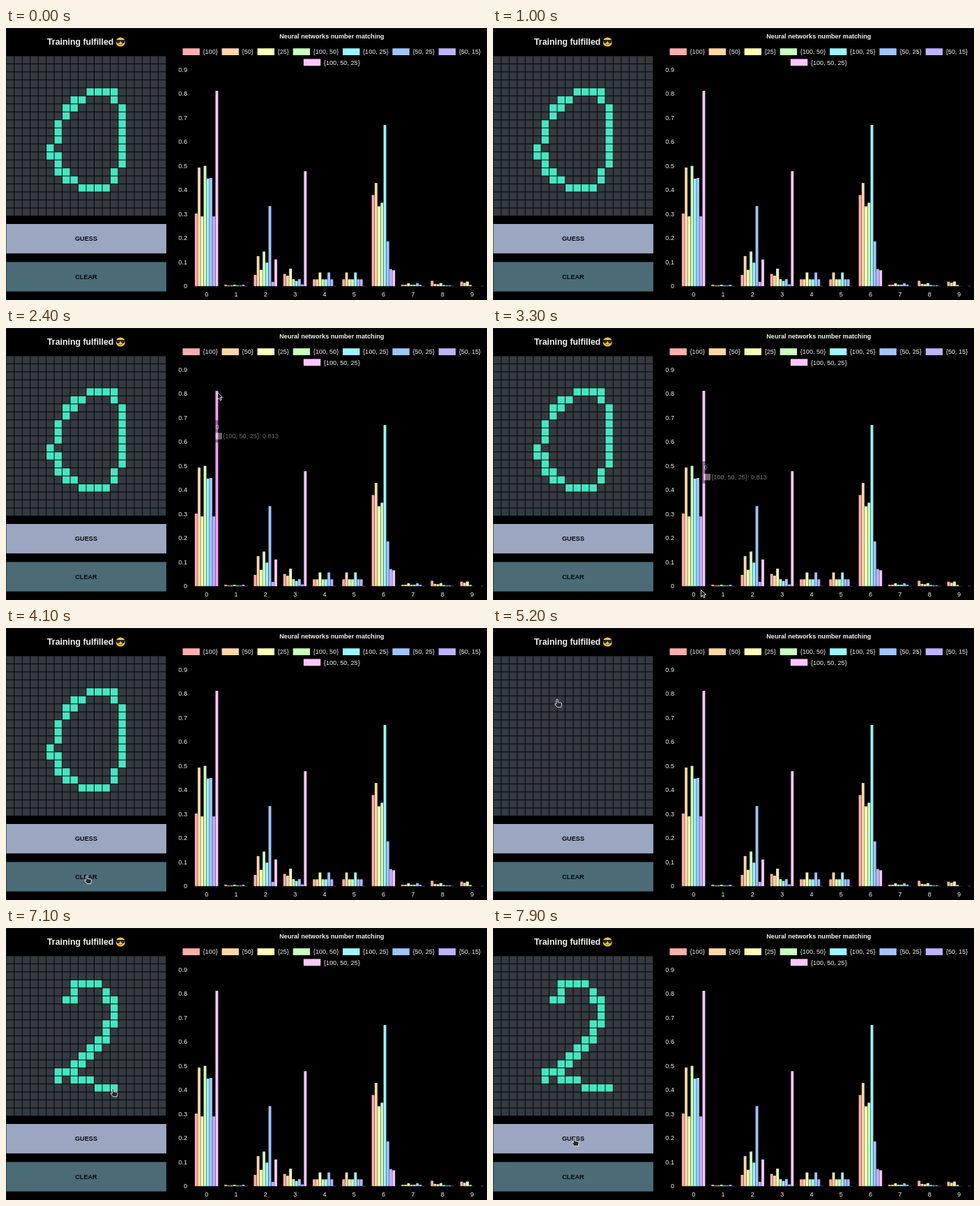
An HTML page for the animation above (8 s loop, 690 px wide and 390 px high).

```html
<!DOCTYPE html>
<html lang="en">
<head>
<meta charset="utf-8">
<title>Number matching</title>
<style>
  html, body { margin: 0; width: 100%; height: 100%; overflow: hidden; background: #000; }
  svg { display: block; width: 690px; height: 390px; }
  text { font-family: "Liberation Sans", Arial, sans-serif; font-size: 9.15px; fill: #f4f4f4; }
  .bold { font-weight: bold; }
  .mid { text-anchor: middle; }
</style>
</head>
<body>
<svg id="stage" viewBox="0 0 690 390"></svg>
<script>
const LOOP = 8000, STEP = 100;
const SIZE = 20, PITCH = 11.48, GRID_Y = 40;
const OFF = '#343a40', ON = '#48e5c2';
const stage = document.getElementById('stage');

function add(tag, attrs, parent = stage, content) {
  const el = document.createElementNS('http://www.w3.org/2000/svg', tag);
  for (const key in attrs) el.setAttribute(key, attrs[key]);
  if (content !== undefined) el.textContent = content;
  parent.appendChild(el);
  return el;
}
const rect = (x, y, width, height, fill, parent) => add('rect', { x, y, width, height, fill }, parent);
const label = (x, y, content, attrs = {}, parent) => add('text', { x, y, ...attrs }, parent, content);
const move = (el, x, y) => el.setAttribute('transform', `translate(${x} ${y})`);

// Left panel
rect(0, 0, 690, 0.8, '#0d2230');
rect(0, 0, 0.7, 390, '#0a1a24');
label(59, 24.4, 'Training fulfilled', { class: 'bold', style: 'font-size:12.35px' });
add('circle', { cx: 164.3, cy: 20, r: 6.6, fill: '#f8c53a' });
add('path', { d: 'M157.8 17h13v1.6q-.5 3.4-3 3.4t-3.1-3h-.8q-.6 3-3.1 3t-3-3.4z', fill: '#23282b' });
add('path', { d: 'M161.6 23.2q2.8 1.8 5.6-.4', fill: 'none', stroke: '#6a4312', 'stroke-width': 0.9 });

const cells = Array.from({ length: SIZE * SIZE }, (_, i) => rect(
  i % SIZE * PITCH + 0.7, GRID_Y + Math.floor(i / SIZE) * PITCH + 0.4, PITCH - 0.95, PITCH - 0.95, OFF));

function button(y, fill, name) {
  rect(0.5, y, 229.5, 42.2, fill);
  label(115, y + 24.4, name, { class: 'bold mid', style: 'fill:#07090c' });
}
button(281, '#9ba6c0', 'GUESS');
button(335.5, '#4b6b77', 'CLEAR');

// Legend
const MID = 467.3, BOX = 24.4, PAD = 4.6, GAP = 5.8;
const COLORS = ['#ffadad', '#ffd6a5', '#fdffb6', '#caffbf', '#9bf6ff', '#a0c4ff', '#bdb2ff', '#ffc6ff'];
const NAMES = ['{100}', '{50}', '{25}', '{100, 50}', '{100, 25}', '{50, 25}', '{50, 15}', '{100, 50, 25}'];

function legendRow(y, from, to) {
  const row = add('g', {});
  let x = 0;
  for (let i = from; i < to; i++) {
    rect(x, y - 4.8, BOX, 9.8, COLORS[i], row);
    const name = label(x + BOX + PAD, y + 3.3, NAMES[i], {}, row);
    x += BOX + PAD + name.getComputedTextLength() + GAP;
  }
  move(row, MID - (x - GAP) / 2, 0);
}
label(MID, 14.8, 'Neural networks number matching', { class: 'bold mid' });
legendRow(34, 0, 7);
legendRow(49.2, 7, 8);

// Chart: strong matches in thousandths, the rest as fading ripples [level, peak, fade]
const BASE = 370.2, UNIT = 345, GROUP = 42.3, BAR = 4.23;
const STRONG = {
  0: [302, 493, 290, 500, 447, 450, 290, 812],
  2: [47, 125, 68, 144, 98, 333, 18, 111],
  6: [379, 429, 332, 347, 670, 186, 71, 66]
};
const WEAK = {
  1: [4, 0, 0], 3: [68, 2, 1], 4: [38, 2, 0], 5: [38, 1, 0], 7: [8, 2, 0], 8: [15, 0, 1], 9: [25, 2, 1.7]
};
const SPIKE = 478;

function score(digit, i) {
  if (STRONG[digit]) return STRONG[digit][i];
  if (i === 7) return digit === 3 ? SPIKE : 1;
  const [level, peak, fade] = WEAK[digit];
  const ripple = 1 + 0.5 * Math.cos((i - peak) * Math.PI * 2 / 3);
  return level * ripple * Math.max(0, 1 - fade * i / 7);
}

const bars = [];
for (let digit = 0; digit < 10; digit++) {
  const mid = 287.8 + digit * GROUP;
  label(260, BASE + 3.2 - digit * UNIT / 10, digit ? '0.' + digit : '0', { 'text-anchor': 'end' });
  label(mid, 385.2, digit, { class: 'mid' });
  COLORS.forEach((color, i) => {
    const h = score(digit, i) / 1000 * UNIT;
    bars.push(rect(mid + (i - 4) * BAR, BASE - h, BAR * 0.91, h, color));
  });
}

// Tooltip
const tip = add('g', {});
const tipBox = add('path', { fill: '#000', 'fill-opacity': 0.8 }, tip);
label(4.6, 12.4, '0', {}, tip);
const swatch = add('rect', { x: 5, y: 18.5, width: 8.4, height: 8.4, stroke: '#fff', 'stroke-width': 0.8 }, tip);
const tipText = label(15.2, 26.1, '', {}, tip);

function setTip(series, value) {
  tipText.textContent = NAMES[series] + ': ' + value;
  swatch.setAttribute('fill', COLORS[series]);
  const right = tipText.getComputedTextLength() + 17;
  tipBox.setAttribute('d', `M3 0H${right}q3 0 3 3V29q0 3-3 3H3q-3 0-3-3V20l-4-4 4-4V3q0-3 3-3z`);
}

// Pointers, with the hot spot at 0,0
const arrow = add('path', {
  d: 'M.4 .4V10.4L2.8 8.3 4.4 11.8 6.2 11 4.7 7.6H7.8z',
  fill: '#15171a', stroke: '#e6e6e6', 'stroke-width': 1
});
const hand = add('path', {
  d: 'M-1.1 1.2q0-1.2 1.1-1.2t1.1 1.2V4.4l4.2.8q1.4.3 1.3 1.7L5.8 11.6H.2L-2.9 7.8q-.7-1.4.6-1.5L-1.1 7.2z',
  fill: '#24282c', stroke: '#f2f2f2', 'stroke-width': 0.9
});

// Interpolates rows of [time, ...values], holding both ends
const linear = k => k;
const smooth = k => k * k * (3 - 2 * k);
function track(rows, t, ease = linear) {
  const next = rows.findIndex(row => row[0] >= t);
  if (next < 1) return rows.at(next).slice(1);
  const a = rows[next - 1], b = rows[next];
  const k = ease((t - a[0]) / (b[0] - a[0]));
  return a.slice(1).map((v, i) => v + (b[i + 1] - v) * k);
}

// Cells along a polyline, stepping sideways before up or down
function trace(points) {
  const path = [points[0]];
  for (let p = 1; p < points.length; p++) {
    const [x, y] = points[p - 1], dx = points[p][0] - x, dy = points[p][1] - y;
    const n = Math.abs(dx) + Math.abs(dy);
    for (let k = 1; k <= n; k++) {
      const across = Math.ceil(k * Math.abs(dx) / n);
      path.push([x + Math.sign(dx) * across, y + Math.sign(dy) * (k - across)]);
    }
  }
  return path;
}

const ZERO = [
  [[13, 5], [13, 4], [10, 4]], [[9, 5], [7, 7]], [[6, 8], [6, 10]],
  [[5, 11], [5, 12], [6, 12], [6, 14], [7, 15], [8, 15]],
  [[9, 16], [12, 16]], [[13, 15], [13, 14]], [[14, 13], [14, 6]]
].flatMap(trace);
const TWO = [
  [[7, 5], [8, 5], [8, 3], [11, 3]],
  [[12, 4], [12, 5], [13, 5], [13, 8], [12, 8], [12, 10], [8, 14], [6, 14], [6, 15]],
  [[8, 15], [10, 15]], [[11, 16], [14, 16]]
].flatMap(trace);

const ENTER = 1600, CLEAR_AT = 4200, DRAW_AT = 5400, DRAW_END = 7200;
const PROGRESS = [[DRAW_AT, 0], [6200, 16], [6400, 24], [DRAW_END, TWO.length - 1]];
const POINTER = [
  [ENTER, 274, 352], [1800, 265, 375], [2400, 303, 92], [2700, 303, 92], [3300, 298, 375],
  [3600, 291, 364], [4100, 116, 355], [4400, 116, 355], [5200, 92, 102]
];
const LEAVE = [[DRAW_END, 165, 228], [7900, 116.5, 301]];
const TIP = [
  [ENTER, 305, 100, 0], [1800, 290, 188.5, 0.55], [2000, 280, 240, 0], [2300, 288, 170, 0],
  [2400, 296, 132.3, 0.45], [2700, 309, 75, 1], [3100, 309, 75, 1], [3300, 298, 191, 0.5], [3500, 292, 230, 0]
];

const drawn = t => Math.round(track(PROGRESS, t)[0]);

function pointerAt(t) {
  if (t < DRAW_AT) return track(POINTER, t, smooth);
  if (t >= DRAW_END) return track(LEAVE, t, smooth);
  const [col, row] = TWO[drawn(t)];
  return [(col + 0.36) * PITCH, GRID_Y + (row + 0.57) * PITCH];
}

const overPad = (x, y) => x < 230 &&
  ((y > GRID_Y && y < 269) || (y > 281 && y < 323) || (y > 335 && y < 378));

function litCells(t) {
  if (t < CLEAR_AT) return ZERO;
  return t < DRAW_AT ? [] : TWO.slice(0, drawn(t) + 1);
}

function draw(t) {
  const lit = new Set(litCells(t).map(([col, row]) => row * SIZE + col));
  cells.forEach((cell, i) => cell.setAttribute('fill', lit.has(i) ? ON : OFF));

  bars[7].setAttribute('fill', t >= 2300 && t < 3200 ? '#ff9bfa' : COLORS[7]);
  if (t < 2200) setTip(0, '0.302');
  else setTip(7, '0.813');
  const [left, top, opacity] = track(TIP, t);
  move(tip, left, top);
  tip.setAttribute('opacity', opacity);

  const [x, y] = pointerAt(t), active = overPad(x, y) ? hand : arrow;
  for (const p of [arrow, hand]) {
    p.setAttribute('visibility', t >= ENTER && p === active ? 'visible' : 'hidden');
    move(p, x, y);
  }
}

let last = -1;
function tick() {
  const t = Math.floor(performance.now() % LOOP / STEP) * STEP;
  if (t !== last) draw(last = t);
  requestAnimationFrame(tick);
}
tick();
</script>
</body>
</html>
```
